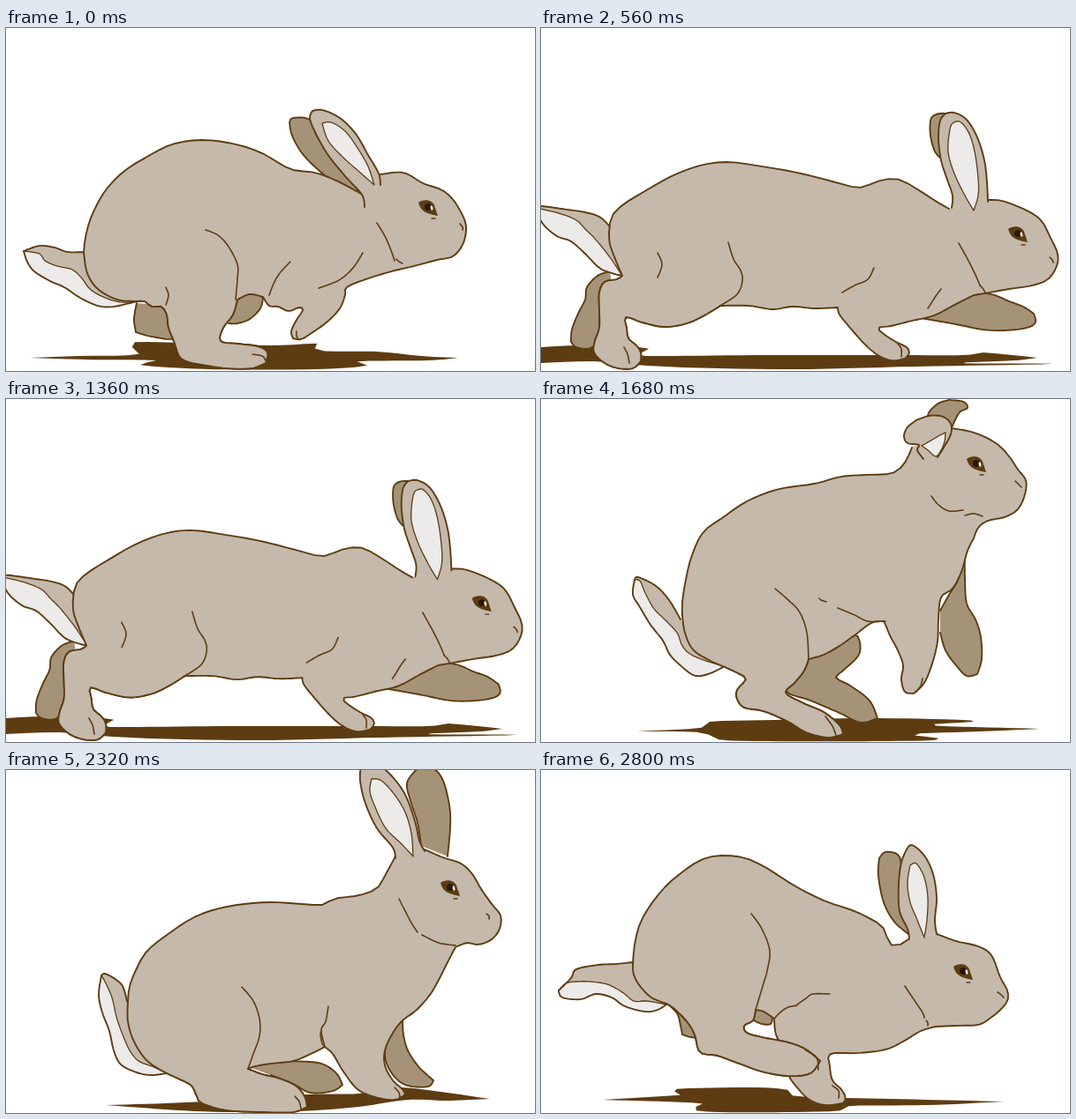
Write an HTML page with a canvas that moves like this. It is 599 px wide and 389 px high and loops after 2880 ms.

```html
<!DOCTYPE html>
<html lang="en">
<head>
<meta charset="utf-8">
<title>Running rabbit</title>
<style>
html, body { margin: 0; width: 100%; height: 100%; overflow: hidden; background: #fff; }
canvas { display: block; width: 599px; height: 389px; }
</style>
</head>
<body>
<canvas id="stage"></canvas>
<script>
const W = 599, H = 389, STEP = 80, N = 40;
const INK = '#5e3c12', FUR = '#c4b9ab', FAR = '#a59378', PALE = '#ecebea';

// Each part is a chain of smooth curves, parted by "|" where it has a corner.
// Body: back | ear gap | head | chest, foreleg | foreleg back | belly | hind leg | heel | rump
const gather = {
  shadow: '27,374 80,372 150,370 140,357 200,357 300,360 355,358 352,366 420,367 470,372 512,374|512,374 480,377 400,378 408,383 350,387 230,387 150,382 170,377 90,376 27,374',
  farHind: '148,312 146,322 145,332 147,345|147,345 165,350 190,352 195,335 185,315',
  farFore: '258,310 270,301 284,301 291,306|291,306 288,318 276,330 262,335 252,335',
  farEar: '398,185 380,181 356,163 336,143 324,122 321,107|321,107 325,102 344,104 352,122 370,148 400,184',
  tail: '90,254 70,254 55,249 38,247 20,253|20,253 24,265 32,276 50,287 66,294 84,306 104,315 122,316 148,310',
  tuft: '148,310 130,311 110,305 95,296 86,284 75,274 58,270 44,264 38,256 20,253',
  body: '88,255 90,237 97,213 112,185 133,163 158,147 188,132 222,127 256,131 288,141 322,160 350,164 376,174 402,188|402,188 424,166|424,166 450,164 472,176 494,184 508,197 519,217 521,230 517,246 506,259 488,263 462,270 440,275|440,275 410,284 386,294 384,303 378,318 364,333 346,346 334,353 325,352|325,352 323,344 329,331 336,320 332,317 320,321 308,316 298,315 291,305|291,305 276,302 262,308|262,308 257,325 246,340 243,355 262,358 285,361 296,368 294,380|294,380 278,386 250,386 222,382 204,378 196,372 190,355 184,340 182,325 176,316 165,316 157,310 148,310|148,310 126,308 104,296 92,278 88,255',
  ear: '406,203 403,189 384,168 364,143 350,118 344,102 347,94|347,94 358,93 378,102 396,120 410,144 422,165 424,178',
  inner: '358,108 368,107 384,117 398,136 410,157 417,178|417,178 400,163 382,147 365,128 358,108',
  eye: '478,204',
  haunch: '226,229 240,235 252,248 262,268 262,285 260,308',
  cheek: '420,221 430,238 437,255 440,264',
  jaw: '442,262 445,265 449,267',
  shoulder: '404,255 393,272 377,286 354,295',
  elbow: '322,265 310,278 303,290 298,303',
  nose: '514,222 517,226 517,229',
  hip: '181,294 184,303 181,314',
  foreToe: '329,344 329,349 331,353',
  hindToe: '279,370 290,372 294,377'
};

const stretch = {
  shadow: '0,362 40,360 115,362 120,368 115,372 250,371 400,371 480,371 500,368 562,374|562,374 540,377 470,380 583,381 420,384 300,387 200,386 120,383 60,378 0,380',
  farHind: '78,276 64,281 52,294 50,308 42,324 35,342 34,356|34,356 40,362 56,363 66,350 70,320 80,290',
  farFore: '430,328 460,318 486,301 510,302 530,310 546,316 558,324|558,324 560,334 550,340 525,343 500,342 470,336 430,329',
  farEar: '455,150 446,140 441,122 441,105 445,99|445,99 452,97 460,100 460,125 462,150',
  tail: '77,224 66,214 50,209 30,206 0,202 -6,204|-6,204 2,222 18,236 34,242 50,256 66,272 80,278 92,281',
  tuft: '92,281 78,260 62,240 50,228 40,218 20,210 -6,204',
  body: '77,232 80,214 92,201 116,186 148,168 180,156 212,152 250,157 290,164 330,174 358,181 374,177 388,172 406,172 428,184 448,197 462,205|462,205 506,195|506,195 522,196 548,206 566,218 577,238 585,256 584,270 574,285 556,292 530,296 508,300 490,303|490,303 470,313 445,326 420,332 396,338 382,340 388,347 402,356 414,362 417,369 412,375|412,375 396,377 380,370 366,358 350,340 338,325 336,317|336,317 310,318 285,316 262,319 235,315 203,315|203,315 185,326 165,335 140,339 115,334 96,328 97,340 99,352 108,360 113,368 113,378|113,378 104,386 88,386 72,380 60,368 61,355 66,340 66,320 66,300 72,288 86,285 92,281|92,281 84,262 78,245 77,232',
  ear: '465,204 466,190 460,172 453,150 450,125 452,105 458,97|458,97 468,96 482,104 494,124 502,150 505,175 506,197',
  inner: '466,108 474,106 484,118 491,140 495,170 495,190 490,207|490,207 480,190 468,165 461,140 463,115 466,108',
  eye: '540,234',
  haunch: '212,243 218,262 226,275 228,287 222,302 203,315',
  cheek: '473,244 483,262 492,280 497,292',
  jaw: '497,292 500,295 503,300',
  shoulder: '377,272 370,285 355,292 341,300',
  elbow: '453,296 447,304 442,312 438,318',
  nose: '576,260 579,263 580,266',
  hip: '132,255 137,268 132,283',
  foreToe: '404,358 408,364 408,373',
  hindToe: '94,362 98,370 100,380'
};

const rear = {
  shadow: '108,377 180,373 190,366 260,364 380,362 495,365 440,370 565,374|565,374 500,377 420,380 455,386 390,388 250,388 200,386 180,378 108,377',
  farHind: '303,294 330,285 352,268 360,272 360,290 342,308 334,316 350,325 372,342 381,362|381,362 362,367 338,356 305,342 278,332 290,318',
  farFore: '452,240 462,222 472,205 479,178 480,205 482,232 492,250 498,270 499,295 494,312|494,312 482,314 470,302 458,285 452,265',
  farEar: '438,20 440,14 450,5 462,1|462,1 478,3 483,10 474,15 467,28 464,36',
  tail: '158,250 145,228 130,212 110,202 106,205|106,205 104,222 112,236 124,256 138,274 146,290 160,304 175,314 192,311 208,303',
  tuft: '208,303 190,298 170,290 160,280 154,265 140,250 128,238 118,220 112,206 106,205',
  body: '160,230 163,210 170,180 183,152 205,135 235,115 270,102 310,96 340,88 370,86 398,84 412,72 420,55|420,55 464,33|464,33 490,38 515,50 530,65 540,80 549,92 548,108 540,125 525,134 506,138 495,146 490,158|490,158 483,172 476,196 466,215 453,225 450,250 449,275 443,300 434,322 422,334|422,334 412,332 408,318 410,302 404,285 396,270 390,256 388,252|388,252 374,254 355,268 338,280 320,290 303,295|303,295 298,308 287,322 277,333 295,344 320,355 338,370 342,380|342,380 325,384 300,378 280,366 252,354 230,350 222,340 222,330 232,318 225,312 208,304|208,304 190,296 172,284 163,265 160,245 160,230',
  ear: '433,68 426,58 428,52 415,50 411,42 415,32 425,24|425,24 440,19 455,20 464,28 464,40 456,55 449,66',
  inner: '431,53 440,48 450,42 458,38|458,38 457,48 453,58 447,65 438,58 431,53',
  eye: '493,74',
  haunch: '265,215 280,228 293,242 301,265 303,295',
  cheek: '442,110 450,120 462,127 478,126',
  jaw: '480,132 490,130 500,133',
  shoulder: '390,252 370,252 355,245 336,237',
  elbow: '315,226 317,228 320,229 323,230',
  nose: '537,93 541,97 544,100',
  foreToe: '432,317 430,325 425,332',
  hindToe: '322,360 330,371 334,381'
};

const sit = {
  shadow: '113,380 180,378 240,375 340,368 400,367 430,360 470,362 548,373|548,373 500,375 455,374 400,382 350,386 300,388 215,387 113,380',
  farHind: '275,337 310,331 345,331 362,335 375,345 381,357|381,357 370,364 345,366 325,356 300,346',
  farFore: '449,283 450,300 455,318 466,335 476,345 484,352|484,352 478,359 455,358 440,348 430,330 430,312 436,298',
  farEar: '470,86 466,60 458,35 454,15 464,0|464,0 480,-4 494,10 502,40 503,65 500,98',
  tail: '137,262 132,245 122,236 112,231 108,233|108,233 105,255 109,275 117,296 122,318 130,334 148,343 164,346 182,344',
  tuft: '182,344 165,336 150,330 140,318 132,300 125,280 120,258 112,240 108,233',
  body: '138,262 140,245 148,225 160,205 185,185 215,166 250,155 295,150 335,152 358,153 372,146 400,142 420,134 430,118 441,98|441,98 474,90|474,90 494,99 515,106 528,118 538,135 550,152 560,165 559,180 550,192 535,198 522,196 509,201|509,201 500,218 490,238 480,255 465,272 448,285 437,300 429,318 429,335 438,352 449,362 452,368|452,368 440,374 418,371 398,362 382,342 370,322 361,314|361,314 345,322 325,330 300,333 282,336 274,339|274,339 290,345 310,350 328,358 338,370 341,382|341,382 325,388 290,388 250,386 222,378 216,370 210,358 195,350 182,344|182,344 160,330 145,308 138,285 138,262',
  ear: '441,100 438,88 420,66 407,38 401,12 402,-6|402,-6 418,-8 436,6 452,28 463,58 468,80 474,92',
  inner: '414,10 425,12 440,28 452,48 459,72 461,98|461,98 448,84 430,66 418,42 412,24 414,10',
  eye: '503,134',
  haunch: '267,246 280,262 287,282 287,302 280,322 274,339',
  cheek: '445,146 452,160 460,175 466,184',
  jaw: '471,187 490,196 509,199',
  shoulder: '365,268 362,285 357,295 361,314',
  elbow: '357,296 356,300 358,310 361,314',
  nose: '544,163 547,166 547,169',
  foreToe: '440,360 445,366 446,373',
  hindToe: '327,370 332,376 334,384'
};

const reach = {
  shadow: '70,374 120,371 160,368 150,362 240,360 280,363 290,370 400,373 524,376|524,376 440,380 350,381 330,387 200,388 170,384 180,378 70,374',
  farHind: '142,264 154,276 158,290 160,300|160,300 170,303 178,302 172,285 165,272 150,262',
  farFore: '243,270 252,272 262,280|262,280 260,288 250,288 241,284',
  farEar: '416,186 400,172 388,150 382,120 383,100|383,100 390,93 404,96 408,110 406,135 414,165',
  tail: '104,218 85,220 65,221 40,226 34,236 20,250|20,250 24,258 45,260 62,254 80,258 95,268 118,274 132,272 142,266',
  tuft: '142,266 120,262 105,262 92,252 75,243 55,240 40,240 28,242 20,250',
  body: '104,220 106,198 113,172 130,145 152,122 186,100 222,98 250,108 285,130 320,148 355,160 375,170 387,178 394,195 402,200 416,192|416,192 448,186|448,186 470,194 495,200 510,210 520,235 528,250 528,262 518,274 505,284 495,289 470,290 447,291|447,291 430,296 410,308 390,317 360,321 328,322 327,335 330,352 340,362 345,372 342,378|342,378 322,380 304,374 290,360 280,345 275,318 266,300 264,282|264,282 252,274 243,272|243,272 240,284 230,290 233,298 250,303 280,309 300,317 316,330|316,330 305,344 280,347 250,342 222,332 200,324 180,320 174,300 165,285 150,270 142,265|142,265 125,258 112,245 105,232 104,220',
  ear: '417,192 415,180 406,160 405,130 408,105 414,90|414,90 420,85 434,97 444,118 448,145 446,170 448,186',
  inner: '418,108 425,106 434,122 438,145 437,170 434,190|434,190 426,170 418,150 415,128 418,108',
  eye: '478,229',
  haunch: '238,163 250,180 259,205 256,228 252,242 246,262 243,272',
  cheek: '412,245 422,260 432,275 434,281',
  jaw: '436,284 438,287 438,290',
  shoulder: '327,254 308,254 300,259 290,266',
  elbow: '290,267 280,269 272,274 264,282',
  nose: '517,252 520,254 524,258',
  foreToe: '330,358 337,364 337,372',
  hindToe: '300,318 312,326 314,340'
};

const trail = {
  ...stretch,
  farHind: '66,266 48,274 38,286 28,305 16,318 6,332 4,346|4,346 8,356 30,360 50,356 46,342 50,330 64,314 70,290',
  farEar: '446,152 434,140 429,122 429,108 434,103|434,103 442,103 447,110 450,130 452,152',
  ear: '465,204 464,188 455,170 446,148 442,122 442,108 447,101|447,101 458,100 474,110 487,128 496,152 502,180 506,197',
  inner: '453,112 460,110 472,122 483,142 490,165 492,185 491,207|491,207 480,192 464,172 452,150 449,130 453,112'
};

// Evenly spaced points along a Catmull-Rom curve
function sample(text) {
  const p = text.trim().split(' ').map(s => s.split(',').map(Number));
  const at = i => p[Math.max(0, Math.min(p.length - 1, i))];
  const fine = [p[0]], run = [0];
  for (let i = 0; i < p.length - 1; i++) {
    for (let k = 1; k <= 12; k++) {
      const u = k / 12;
      const q = [0, 1].map(c => {
        const [a, b, d, e] = [at(i - 1)[c], at(i)[c], at(i + 1)[c], at(i + 2)[c]];
        return b + u * ((d - a) + u * ((2 * a - 5 * b + 4 * d - e) + u * (3 * b - a - 3 * d + e))) / 2
          - u * (d - a) / 2 + u * (d - a) / 2;
      });
      const last = fine[fine.length - 1];
      run.push(run[run.length - 1] + Math.hypot(q[0] - last[0], q[1] - last[1]));
      fine.push(q);
    }
  }
  let j = 0;
  return Array.from({ length: N }, (_, n) => {
    const s = run[run.length - 1] * n / (N - 1);
    while (j < run.length - 2 && run[j + 1] < s) j++;
    if (fine.length < 2) return fine[0];
    const f = (s - run[j]) / (run[j + 1] - run[j] || 1);
    return [0, 1].map(c => fine[j][c] + (fine[j + 1][c] - fine[j][c]) * f);
  });
}

const mapPose = (pose, fn) => Object.fromEntries(Object.entries(pose).map(([k, v]) => [k, fn(v, k)]));
const mapPts = (segs, fn) => segs.map(seg => seg.map(fn));
const build = pose => mapPose(pose, text => text.split('|').map(sample));

const poses = { A: gather, B: stretch, C: trail, D: rear, E: sit, F: reach };
for (const k in poses) poses[k] = build(poses[k]);
// Stretch, slightly raised
poses.G = mapPose(poses.B, (segs, k) => k === 'shadow' ? segs : mapPts(segs, ([x, y]) => {
  const h = 375 - y;
  return [x - h * (k === 'tail' || k === 'tuft' ? 0 : .009), 375 - h * 1.014];
}));

// One entry per step: a pose, or two poses and tenths of the way between
const steps = ('A AB5 B BF5 F A AB5 B BF5 F A AC5 C CF5 F A AG5 G GF5 F FD5 D ' +
  'DE2 DE4 DE6 DE8 DE9 E E E EA5 A AB5 B BF5 F').split(' ');

function blend([from, to, tenths]) {
  const a = poses[from];
  if (!to) return a;
  const b = poses[to], t = tenths / 10, out = {};
  for (const k in a) {
    if (!b[k]) continue;
    const lift = to === 'F' && /ear|inner/i.test(k) ? .2 : 0;
    out[k] = a[k].map((seg, s) => seg.map(([x, y], i) => {
      const [u, v] = b[k][s][i], ny = y + (v - y) * t;
      return [x + (u - x) * t, ny - Math.max(0, 200 - ny) * lift];
    }));
  }
  return out;
}

const canvas = document.getElementById('stage'), g = canvas.getContext('2d');
const dpr = window.devicePixelRatio || 1;
canvas.width = W * dpr;
canvas.height = H * dpr;
g.scale(dpr, dpr);
g.lineJoin = g.lineCap = 'round';

function trace(segs) {
  g.beginPath();
  segs.flat().forEach(([x, y], i) => i ? g.lineTo(x, y) : g.moveTo(x, y));
}
function fill(segs, color) {
  trace(segs);
  g.fillStyle = color;
  g.fill();
}
function line(segs, width = 1.9) {
  trace(segs);
  g.strokeStyle = INK;
  g.lineWidth = width;
  g.stroke();
}
function shape(segs, color, width) {
  fill(segs, color);
  line(segs, width);
}

function drawEye([x, y]) {
  g.save();
  g.translate(x, y);
  g.fillStyle = INK;
  g.beginPath();
  g.moveTo(-11, -6);
  g.bezierCurveTo(-6, -10, 4, -10, 7, -3);
  g.lineTo(11, 9);
  g.bezierCurveTo(2, 7, -8, 6, -11, -6);
  g.fill();
  g.fillStyle = '#2b1907';
  g.beginPath();
  g.arc(0, -1, 4, 0, 7);
  g.fill();
  g.fillStyle = '#fff';
  g.beginPath();
  g.ellipse(4, 0, 1.3, 2.8, -.2, 0, 7);
  g.fill();
  g.restore();
  line([[[x + 4, y + 12], [x + 8, y + 12]]], 1.3);
}

function draw(p) {
  g.fillStyle = '#fff';
  g.fillRect(0, 0, W, H);
  fill(p.shadow, INK);
  for (const k of ['farHind', 'farFore', 'farEar']) shape(p[k], FAR);
  fill(p.tail, FUR);
  fill([p.tail[1], p.tuft[0]], PALE);
  line(p.tuft, 1.3);
  line(p.tail);
  fill(p.body, FUR);
  line(p.body.slice(0, 1));
  line(p.body.slice(2));
  shape(p.body.slice(6, 8), FUR);
  shape(p.ear, FUR);
  shape(p.inner, PALE, 1.3);
  for (const k of ['haunch', 'cheek', 'jaw', 'shoulder', 'elbow', 'nose', 'hip', 'foreToe', 'hindToe'])
    if (p[k]) line(p[k], 1.6);
  drawEye(p.eye[0][0]);
}

const scenes = steps.map(blend);
const start = performance.now();
let shown = -1;
function tick() {
  const i = Math.floor((performance.now() - start) / STEP) % scenes.length;
  if (i !== shown) draw(scenes[shown = i]);
  requestAnimationFrame(tick);
}
tick();
</script>
</body>
</html>
```
